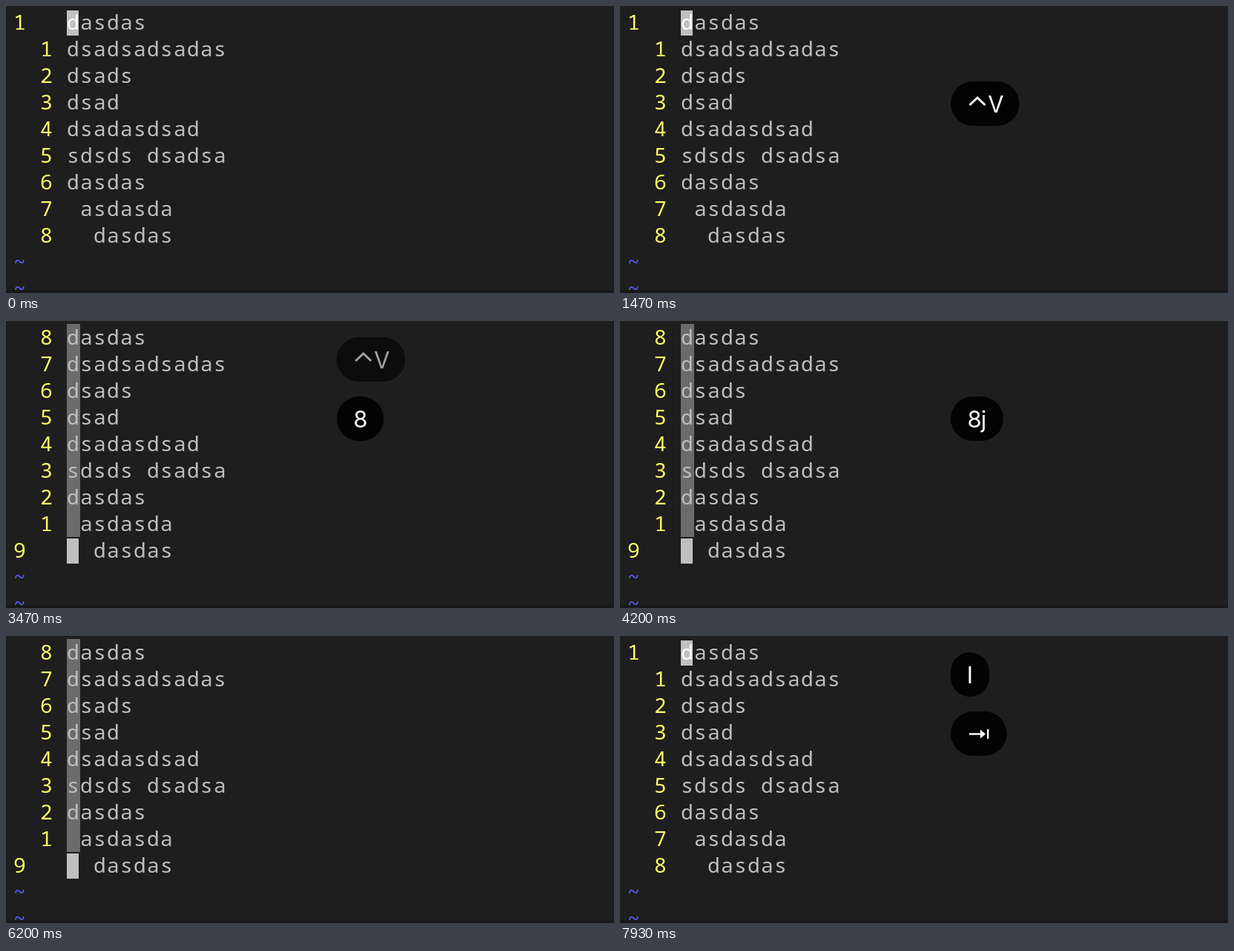
An HTML page with a canvas for the animation above (8 s loop, 820x388 px).

```html
<!DOCTYPE html>
<html lang="en">
<head>
<meta charset="utf-8">
<title>Block selection in an editor</title>
<style>
html, body { margin: 0; width: 100%; height: 100%; overflow: hidden; background: #1e1e1e; }
canvas { display: block; }
</style>
</head>
<body>
<canvas id="stage" width="820" height="388"></canvas>
<script>
const ctx = document.getElementById('stage').getContext('2d');
const LOOP = 8000, TICK = 1000 / 15;
const COL = 18, ROW = 36, LEFT = 10, TOP = 4, TEXT_COL = 4;
const PILL_X = 446, PILL_H = 60, UPPER = 22, LOWER = 102;
const lines = ['dasdas', 'dsadsadsadas', 'dsads', 'dsad', 'dsadasdsad',
  'sdsds dsadsa', 'dasdas', ' asdasda', '  dasdas'];

const colX = col => LEFT + col * COL;
const rowY = row => TOP + row * ROW;

function rect(color, x, y, w, h) {
  ctx.fillStyle = color;
  ctx.fillRect(x, y, w, h);
}

function write(str, col, row, color) {
  ctx.font = '28px "Noto Sans Mono", monospace';
  ctx.fillStyle = color;
  [...str].forEach((ch, i) => ctx.fillText(ch, colX(col + i), rowY(row) + 28));
}

function drawEditor(current, selecting, showCursor) {
  rect('#1e1e1e', 0, 0, 820, 388);
  if (selecting) rect('#6b6b6b', colX(TEXT_COL), TOP, COL, current * ROW);
  if (showCursor) rect('#c0c0c0', colX(TEXT_COL), rowY(current) + 2, 16, 34);
  lines.forEach((line, row) => {
    const here = row === current;
    write(String(here ? row + 1 : Math.abs(row - current)), here ? 0 : 2, row, '#ffff66');
    write(line, TEXT_COL, row, '#bfbfbf');
    if (here && showCursor) write(line[0], TEXT_COL, row, '#fff');
  });
  write('~', 0, 9, '#5c5cff');
  write('~', 0, 10, '#5c5cff');
  rect('#191919', 0, 384, 820, 4);
}

function path(points) {
  ctx.beginPath();
  points.forEach(([x, y]) => ctx.lineTo(x, y));
}

// Key symbols, drawn relative to the pill's top left corner.
const label = (str, x) => ctx.fillText(str, x, 42);
const keys = {
  ctrlV: { width: 92.5, draw() {
    path([[25.5, 32], [36, 22], [46.5, 32]]);
    ctx.stroke();
    label('V', 61);
  } },
  eight: { width: 63.5, draw: () => label('8', 32) },
  eightJ: { width: 71, draw() { label('8', 32); label('j', 44.5); } },
  capI: { width: 52, draw: () => label('I', 26) },
  tab: { width: 75.5, draw() {
    ctx.fillRect(25, 29.3, 16, 2.4);
    path([[40, 24.5], [47, 30.5], [40, 36.5]]);
    ctx.fill();
    ctx.fillRect(49, 24, 2.4, 13);
  } }
};

function pill({ width, draw }, y, alpha = 1) {
  if (alpha <= 0) return;
  ctx.save();
  ctx.globalAlpha = alpha;
  ctx.translate(PILL_X, y);
  ctx.fillStyle = '#030303';
  ctx.beginPath();
  ctx.roundRect(0, 0, width, PILL_H, Math.min(30, width / 2));
  ctx.fill();
  ctx.fillStyle = ctx.strokeStyle = '#fff';
  ctx.lineWidth = 3;
  ctx.font = '31px Inter, sans-serif';
  ctx.textAlign = 'center';
  draw();
  ctx.restore();
}

// A pill drops to partial opacity, then fades at 15 steps per second.
const fade = (t, start) => t < start ? 1 : 0.62 - 0.27 * Math.floor((t - start + 8) / TICK);

function render(t) {
  const selecting = t >= 3470 && t < 6870;
  const hidden = t >= 6870 && t < 6935;
  drawEditor(selecting ? 8 : 0, selecting, !hidden);

  if (t >= 1470) pill(keys.ctrlV, t < 3270 ? LOWER : UPPER, fade(t, 3470));
  if (t >= 3270 && t < 3530) pill(keys.eight, LOWER);
  if (t >= 3530) pill(keys.eightJ, LOWER, fade(t, 5530));
  if (t >= 6870) pill(keys.capI, t < 7930 ? LOWER : UPPER);
  if (t >= 7930) pill(keys.tab, LOWER);
}

const begin = performance.now();
function frame() {
  render((performance.now() - begin) % LOOP);
  requestAnimationFrame(frame);
}
frame();
</script>
</body>
</html>
```
